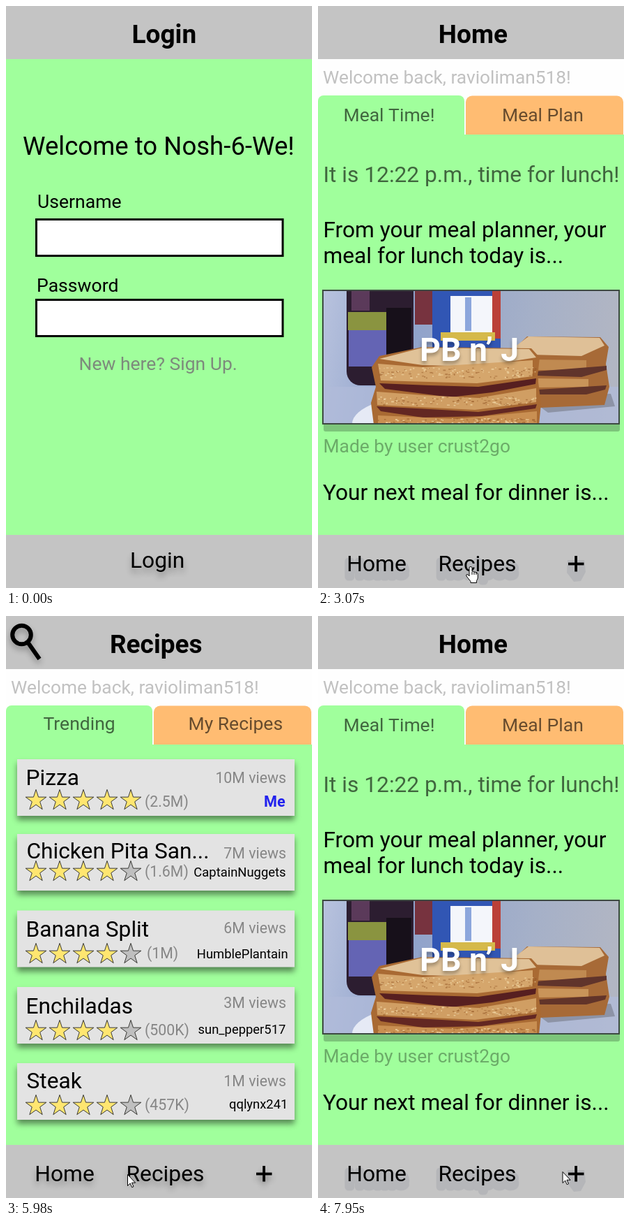
Animation of 439 by 833 pixels, one loop 8000 ms. Source, as an HTML page with a canvas:

```html
<!DOCTYPE html>
<html lang="en">
<head>
<meta charset="utf-8">
<title>Meal app</title>
<style>
html, body { margin: 0; width: 100%; height: 100%; overflow: hidden; background: #a0ff9c; }
canvas { display: block; width: 439px; height: 833px; }
</style>
</head>
<body>
<canvas id="stage"></canvas>
<script>
const W = 439, H = 833, LOOP = 8000;
const GREEN = '#a0ff9c', GREY = '#c4c4c4', ORANGE = '#ffbc72', FADED = 'rgba(0,0,0,.6)';
const canvas = document.getElementById('stage');
const ctx = canvas.getContext('2d');
const dpr = window.devicePixelRatio || 1;
canvas.width = W * dpr;
canvas.height = H * dpr;

// [start, page]
const pages = [[0, login], [1540, home], [4320, recipes], [6810, home]];

// [start, shape, x, y]
const moves = [
  [0, null, 0, 0],
  [500, arrow, 131, 771], [650, arrow, 188, 783],
  [800, hand, 209, 799], [950, hand, 217, 802],
  [3070, hand, 212, 802], [3220, hand, 208, 802], [3340, hand, 205, 802],
  [3490, hand, 200, 801], [3610, hand, 195.5, 799],
  [4320, arrow, 202, 799], [5980, arrow, 174, 799],
  [6130, hand, 102, 800], [6250, hand, 74, 797.5],
  [7650, arrow, 130, 777], [7800, arrow, 308, 788], [7950, arrow, 350.5, 795]
];

const dishes = [
  { name: 'Pizza', top: 205, base: 242, views: '10M', viewY: 239, stars: 5, starY: 264, votes: '2.5M', voteX: 200, voteY: 272.5, by: 'Me', byX: 401, byY: 272.5 },
  { name: 'Chicken Pita San...', top: 312, base: 346.5, views: '7M', viewY: 346.5, stars: 4, starY: 366, votes: '1.6M', voteX: 200, voteY: 372.5, by: 'CaptainNuggets', byX: 401, byY: 372.5 },
  { name: 'Banana Split', top: 421.5, base: 459, views: '6M', viewY: 453.5, stars: 4, starY: 484, votes: '1M', voteX: 203, voteY: 490, by: 'HumblePlantain', byX: 403.5, byY: 490 },
  { name: 'Enchiladas', top: 531, base: 568.5, views: '3M', viewY: 560.5, stars: 4, starY: 594, votes: '500K', voteX: 200, voteY: 599.5, by: 'sun_pepper517', byX: 401, byY: 597.5 },
  { name: 'Steak', top: 640, base: 676, views: '1M', viewY: 673, stars: 4, starY: 701, votes: '457K', voteX: 200, voteY: 707, by: 'qqlynx241', byX: 401, byY: 704.5 }
];

function rect(x, y, w, h, color) {
  ctx.fillStyle = color;
  ctx.fillRect(x, y, w, h);
}

function round(x, y, w, h, radii, color) {
  ctx.fillStyle = color;
  ctx.beginPath();
  ctx.roundRect(x, y, w, h, radii);
  ctx.fill();
}

function poly(color, ...p) {
  ctx.fillStyle = color;
  ctx.beginPath();
  for (let i = 0; i < p.length; i += 2) ctx.lineTo(p[i], p[i + 1]);
  ctx.closePath();
  ctx.fill();
}

function setFont(size, weight = 400) {
  ctx.font = `${weight} ${size}px Roboto, "Open Sans", sans-serif`;
}

// Places the ink edge of the text at x.
function text(s, x, y, size, color = '#000', weight = 400, right = false) {
  setFont(size, weight);
  const m = ctx.measureText(s);
  ctx.fillStyle = color;
  ctx.fillText(s, right ? x - m.actualBoundingBoxRight : x + m.actualBoundingBoxLeft, y);
}

function shadow(blur, dy, alpha, draw) {
  ctx.save();
  ctx.shadowColor = `rgba(0,0,0,${alpha})`;
  ctx.shadowBlur = blur * dpr;
  ctx.shadowOffsetY = dy * dpr;
  draw();
  ctx.restore();
}

function bars() {
  rect(0, 0, W, 76, GREY);
  rect(0, 757, W, 76, GREY);
}

function plus() {
  rect(359, 796.6, 22.5, 3.8, '#000');
  rect(368.2, 787, 3.8, 22.5, '#000');
}

function blob(s, x, y) {
  setFont(31.8);
  ctx.save();
  ctx.strokeStyle = '#b5b6b9';
  ctx.lineWidth = 11;
  ctx.lineJoin = 'round';
  ctx.strokeText(s, x + ctx.measureText(s).actualBoundingBoxLeft, y + 8);
  ctx.restore();
}

function nav(solid) {
  const labels = [['Home', 43.3], ['Recipes', 174.5]];
  if (solid) {
    for (const [s, x] of labels) blob(s, x, 809);
    poly('#b5b6b9', 358, 793, 382, 793, 384, 810, 377, 823, 367, 824, 357, 811);
  }
  const draw = () => {
    for (const [s, x] of labels) text(s, x, 809, 31.8);
    plus();
  };
  if (solid) draw();
  else shadow(9, 6, .3, draw);
}

function tabs(left, lx, right, rx, y) {
  rect(0, 76, W, 108, '#fefefe');
  round(0, 128, 210, 60, [8, 8, 0, 0], GREEN);
  round(212, 128.5, 226, 55.5, [9, 9, 0, 0], ORANGE);
  text('Welcome back, ravioliman518!', 7, 111, 26.3, '#c1c1c1');
  text(left, lx, y, 26.5, FADED);
  text(right, rx, y, 26.5, FADED);
}

function login() {
  rect(0, 0, W, H, GREEN);
  bars();
  text('Login', 182.5, 53, 37, '#000', 700);
  text('Welcome to Nosh-6-We!', 25, 213, 36.6);
  text('Username', 46, 288.5, 26.6);
  text('Password', 46, 408.5, 26.6);
  for (const y of [304, 419]) {
    rect(42, y, 356.5, 55, '#000');
    rect(45, y + 3, 350.5, 49, '#fff');
  }
  text('New here? Sign Up.', 106.5, 521, 26.5, '#7d8a7c');
  shadow(9, 7, .3, () => text('Login', 180, 804, 31.8));
}

function home() {
  rect(0, 0, W, H, GREEN);
  bars();
  text('Home', 174.8, 53, 37, '#000', 700);
  tabs('Meal Time!', 38.5, 'Meal Plan', 266, 165);
  text('It is 12:22 p.m., time for lunch!', 9.5, 252, 31.7, FADED);
  text('From your meal planner, your', 9.5, 330.5, 31.7);
  text('meal for lunch today is...', 9.5, 367.5, 31.7);
  round(8, 590, 425, 19, 3, '#7cc57a');
  photo();
  text('Made by user crust2go', 9.5, 639, 26.4, 'rgba(0,0,0,.33)');
  text('Your next meal for dinner is...', 7, 707, 31.7);
  nav(true);
}

function photo() {
  ctx.save();
  ctx.beginPath();
  ctx.rect(6, 406, 427, 193);
  ctx.clip();
  const sky = ctx.createLinearGradient(6, 406, 433, 480);
  sky.addColorStop(0, '#b9c3de');
  sky.addColorStop(.3, '#8fa2cb');
  sky.addColorStop(.7, '#a5b0c8');
  sky.addColorStop(1, '#b2b6c3');
  rect(6, 406, 427, 193, sky);
  rect(6, 545, 427, 54, 'rgba(176,187,218,.75)');

  // jelly jar
  round(41, 400, 96, 143, [4, 4, 20, 20], '#2c1d30');
  rect(48, 406, 26, 30, '#5b3a5a');
  rect(43, 438, 74, 26, '#8a9440');
  rect(44, 464, 64, 52, '#6464b4');
  rect(98, 432, 36, 100, '#17101a');

  // second jar
  rect(139, 406, 26, 50, '#77333f');
  round(164, 400, 98, 100, [0, 0, 12, 12], '#3156b4');
  rect(190, 415, 62, 52, '#f4f6fb');
  rect(211, 417, 9, 48, '#8ca6dc');
  rect(250, 406, 12, 70, '#bb4038');
  rect(176, 467, 78, 12, '#d5b94a');

  // stack behind
  poly('#8d93a6', 300, 560, 420, 555, 426, 573, 330, 582);
  poly('#a76a37', 282, 490, 300, 473, 405, 474, 417, 488, 413, 512, 418, 545, 411, 571, 318, 575, 300, 560);
  poly('#dfc097', 282, 488, 302, 473, 404, 475, 411, 486, 378, 501, 306, 499);
  poly('#c08a51', 312, 506, 385, 507, 385, 522, 312, 521);
  poly('#60342b', 312, 523, 414, 515, 414, 521, 378, 531, 312, 529);
  poly('#c99459', 316, 533, 388, 534, 388, 545, 316, 546);
  poly('#623429', 317, 549, 414, 543, 412, 549, 385, 556, 317, 556);

  // plate and front stack
  ctx.fillStyle = '#e6eaf5';
  ctx.beginPath();
  ctx.ellipse(170, 598, 121, 43, 0, 0, 7);
  ctx.fill();
  poly('#a96a33', 77, 517, 88, 501, 150, 488, 306, 490, 318, 503, 315, 530, 320, 570, 317, 599, 80, 599, 76, 568, 83, 545);
  poly('#e0c298', 88, 505, 150, 489, 303, 491, 313, 503, 230, 516, 150, 514);
  poly('#d5a66c', 86, 512, 150, 517, 308, 507, 308, 530, 228, 540, 90, 536);
  poly('#571f20', 88, 540, 160, 543, 230, 545, 313, 533, 312, 541, 250, 553, 190, 560, 96, 548);
  poly('#d09e63', 84, 552, 150, 557, 230, 561, 313, 547, 313, 567, 225, 578, 85, 571);
  poly('#632722', 84, 573, 160, 577, 230, 581, 314, 570, 312, 576, 235, 587, 150, 589, 90, 580);
  poly('#c98f52', 86, 586, 200, 591, 314, 580, 314, 599, 86, 599);
  let seed = 7;
  const rnd = () => (seed = seed * 16807 % 2147483647) / 2147483647;
  for (let i = 0; i < 420; i++) {
    const x = 86 + rnd() * 226, layer = Math.floor(rnd() * 3);
    const y = [517, 559, 590][layer] + rnd() * [15, 12, 8][layer];
    rect(x, y, 1 + rnd() * 3, 1 + rnd(), rnd() < .5 ? 'rgba(241,214,165,.75)' : 'rgba(151,91,42,.55)');
  }
  ctx.restore();
  ctx.strokeStyle = '#3c4a40';
  ctx.lineWidth = 2;
  ctx.strokeRect(7, 407, 425, 191);
  shadow(5, 4, .3, () => text('PB n’ J', 148, 508, 46.3, '#fff', 700));
}

function star(cx, cy, fill) {
  ctx.beginPath();
  for (let i = 0; i < 10; i++) {
    const a = i * Math.PI / 5, r = i % 2 ? 6 : 15.6;
    ctx.lineTo(cx + r * Math.sin(a), cy - r * Math.cos(a));
  }
  ctx.closePath();
  ctx.fillStyle = fill;
  ctx.fill();
  ctx.strokeStyle = '#3a3a36';
  ctx.lineWidth = 1;
  ctx.stroke();
}

function magnifier() {
  ctx.strokeStyle = '#000';
  ctx.lineWidth = 6;
  ctx.beginPath();
  ctx.arc(22.5, 27, 13.3, 0, 7);
  ctx.moveTo(31.5, 38);
  ctx.lineTo(48, 61.5);
  ctx.stroke();
}

function recipes() {
  rect(0, 0, W, H, GREEN);
  bars();
  shadow(8, 5, .3, magnifier);
  text('Recipes', 151, 53, 37, '#000', 700);
  tabs('Trending', 53.5, 'My Recipes', 263.5, 163);
  for (const d of dishes) {
    shadow(8, 6, .45, () => rect(16, d.top, 398, 81, '#e3e3e3'));
    text(d.name, 30.5, d.base, 31.7);
    text(d.views + ' views', 401, d.viewY, 21.3, '#868686', 400, true);
    for (let i = 0; i < 5; i++) star(43 + i * 34, d.starY, i < d.stars ? '#ffe670' : '#bfbfbf');
    text(`(${d.votes})`, d.voteX, d.voteY, 21.3, '#868686');
    const me = d.by === 'Me';
    text(d.by, d.byX, d.byY, me ? 21.6 : 18.4, me ? '#2222ee' : '#000', me ? 700 : 400, true);
  }
  nav(false);
}

function cursor(path, x, y) {
  ctx.save();
  ctx.translate(x, y);
  ctx.fillStyle = '#fff';
  ctx.strokeStyle = '#000';
  ctx.lineWidth = 1;
  ctx.lineJoin = 'round';
  ctx.fill(path);
  ctx.stroke(path);
  ctx.restore();
}

function arrow(x, y) {
  cursor(new Path2D('M.5 .5V16.5L4.2 13L6.7 18.7L9 17.7L6.5 12.2H11.6Z'), x, y);
}

function hand(x, y) {
  cursor(new Path2D('M5 2.2Q5 .5 7 .5T9 2.2V7.2Q11.4 6.5 12 8.2Q14.2 7.6 15 9.2Q17.3 9 17.3 11V16Q17.3 18 15.6 20.5V23.5H7V21.5Q4 18 1 14Q0 11.6 2 11.5Q3.4 11.6 5 14Z'), x, y);
  ctx.lineWidth = 1;
  ctx.strokeStyle = '#000';
  ctx.beginPath();
  for (const dx of [9, 12, 15]) {
    ctx.moveTo(x + dx, y + 8);
    ctx.lineTo(x + dx, y + 12);
  }
  ctx.stroke();
}

const at = (list, t) => list.findLast(k => k[0] <= t);

let lastPage, lastMove;
function frame(now) {
  const t = now % LOOP;
  const page = at(pages, t), move = at(moves, t);
  if (page !== lastPage || move !== lastMove) {
    ctx.setTransform(dpr, 0, 0, dpr, 0, 0);
    page[1]();
    const [, shape, x, y] = move;
    if (shape) shape(x, y);
    lastPage = page;
    lastMove = move;
  }
  requestAnimationFrame(frame);
}
frame(0);
</script>
</body>
</html>
```
